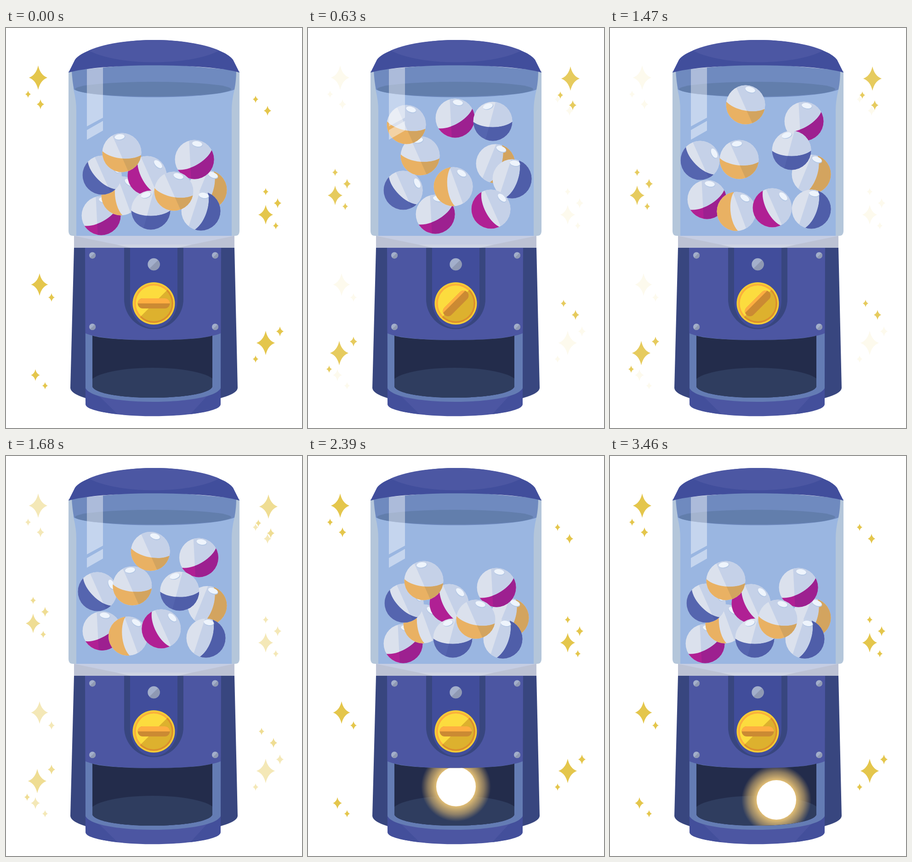
Write an HTML page that moves like this. It is 644 px wide and 870 px high and loops after 4460 ms.

```html
<!DOCTYPE html>
<html lang="en">
<head>
<meta charset="utf-8">
<title>Capsule machine</title>
<style>
  html, body { margin: 0; width: 100%; height: 100%; overflow: hidden; background: #fff; }
  svg { display: block; width: 100%; height: 100%; }
</style>
</head>
<body>
<svg viewBox="0 0 644 870">
  <defs>
    <clipPath id="round"><circle r="42.5"/></clipPath>
    <clipPath id="cap"><path d="M-44 0C-24 17 24 17 44 0V44H-44Z"/></clipPath>
    <clipPath id="bar"><rect x="-35" y="-11" width="70" height="22" rx="11"/></clipPath>
    <clipPath id="hatch"><path d="M188 669C225 682 412 682 449 669V780C437 812 200 812 188 780Z"/></clipPath>
    <path id="star" d="M0-1.33Q.22-.3 1 0Q.22 .3 0 1.33Q-.22 .3-1 0Q-.22-.3 0-1.33Z"/>
    <radialGradient id="halo">
      <stop offset=".56" stop-color="#e3bf75"/>
      <stop offset=".8" stop-color="#dcb76f" stop-opacity=".55"/>
      <stop offset="1" stop-color="#dcb76f" stop-opacity="0"/>
    </radialGradient>
  </defs>

  <g id="starsA" fill="#e4c64c"></g>
  <g id="starsB" fill="#e4c64c"></g>

  <!-- glass -->
  <path fill="#b4c6da" d="M136 94H508V442Q508 452 498 452H146Q136 452 136 442Z"/>
  <path fill="#9ab6e1" d="M144 94L147 134Q153 158 153 180V452H491V180Q491 158 497 134L500 94Z"/>
  <path fill="#6f8abf" d="M143 92Q144 114 148 134C200 156 444 156 497 134Q501 114 501 92L322 76Z"/>
  <ellipse fill="#627eac" cx="320" cy="133" rx="170" ry="16"/>
  <g id="balls"></g>
  <path fill="#fff" fill-opacity=".42" d="M176 80H211V195L176 214ZM176 222L211 202V223L176 243Z"/>

  <!-- lid -->
  <path fill="#414e9c" d="M136 97L150 69C167 45 245 26 322 26S477 45 494 69L508 97C440 76 205 76 136 97Z"/>
  <path fill="#4c57a3" d="M180 49C214 34 268 26 322 26S430 34 464 49C400 83 244 83 180 49Z"/>

  <!-- collar -->
  <path fill="#bcc2d4" d="M148 452H497V478H148Z"/>
  <path fill="#c5cde3" d="M148 452H497L405 471H240Z"/>
  <path fill="#ced4e3" d="M240 471H405L375 478H270Z"/>

  <!-- body -->
  <path fill="#38467f" d="M148 478H497L504 783Q503 795 467 805H173Q141 795 140 783Z"/>
  <path fill="#4c56a2" d="M172 478H468L467 818C450 853 190 853 173 818Z"/>
  <path fill="#434f9b" d="M173 785L205 803L243 840Q173 832 173 818ZM467 785L435 803L401 840Q467 832 467 818Z"/>
  <path fill="#647cb4" d="M173 664C215 684 425 684 467 664V783C450 823 190 823 173 783Z"/>
  <g clip-path="url(#hatch)">
    <path fill="#232c4b" d="M188 660H449V810H188Z"/>
    <ellipse fill="#2f3d5f" cx="319" cy="773" rx="137" ry="34"/>
    <g id="prize">
      <circle r="76" fill="url(#halo)"/>
      <circle r="43" fill="#fff"/>
    </g>
  </g>
  <path fill="#38467f" d="M257 478H386V590A64.5 65 0 0 1 257 590Z"/>
  <path fill="#414d9b" d="M270 478H373V592A51.5 61 0 0 1 270 592Z"/>
  <g id="studs"></g>

  <!-- knob -->
  <g transform="translate(321.5 599)">
    <circle r="46" fill="#f5cc36"/>
    <circle r="42.5" fill="#fbae3b"/>
    <circle r="39" fill="#fcdc3e"/>
    <path d="M-42.5 0A42.5 42.5 0 0 0 42.5 0Z" transform="rotate(-45)" fill="#823900" fill-opacity=".26"/>
    <g id="handle"><g clip-path="url(#bar)">
      <path fill="#cb8a33" d="M-40-20H40V20H-40Z"/>
      <path id="shine" fill="#ffae41" d="M-60-80H60V0H-60Z"/>
    </g></g>
  </g>
</svg>

<script>
const LOOP = 4460;
const $ = id => document.getElementById(id);

const HUES = {
  orange: ['#e9b163', '#d3a45f'],
  pink: ['#b02094', '#9d2090'],
  blue: ['#5565af', '#4f5ea9']
};

// Back to front: where each ball rests, is tossed, sinks and is tossed again
const TOSS_STEPS = [0, 9, 14, 21, 31];
const BALLS = [
  { hue: 'pink', cap: -30, spot: 10, tilt: 3, path: '207,408 277,405 273,406 211,373' },
  { hue: 'orange', cap: 84, spot: 32, tilt: 20, path: '250,365 316,345 297,319 275,399' },
  { hue: 'blue', cap: 45, spot: 63, tilt: 24, path: '209,320 207,353 219,355 196,288' },
  { hue: 'orange', cap: -72, spot: 21, tilt: -22, path: '438,352 408,295 442,344 438,318' },
  { hue: 'pink', cap: -30, spot: 10, tilt: 3, path: '410,286 320,196 330,263 422,203' },
  { hue: 'blue', cap: -71, spot: 10, tilt: -18, path: '424,398 444,328 428,315 438,394' },
  { hue: 'pink', cap: 63, spot: 44, tilt: 24, path: '307,321 398,394 374,364 353,391' },
  { hue: 'orange', cap: 6, spot: -8, tilt: 24, path: '252,271 244,278 255,287 281,286' },
  { hue: 'blue', cap: 0, spot: -18, tilt: -15, path: '315,396 402,203 307,277 395,266' },
  { hue: 'orange', cap: 11, spot: 17, tilt: 24, path: '365,355 214,210 283,320 295,167' }
];

// Star groups, each star as x, y and half width
const GROUPS = {
  trio: [[0, 0, 20], [-22, 36, 6], [5, 58, 8]],
  pair: [[0, 0, 6], [26, 25, 8]],
  quad: [[0, 0, 16], [0, -50, 6], [26, -25, 8], [22, 24, 6]],
  flare: [[0, 0, 20], [31, -25, 8], [-22, 35, 6]],
  duo: [[0, 0, 18.5], [26, 28, 7]],
  spark: [[0, 0, 9.5], [21, 23, 6]]
};
const SKY_A = { trio: [70, 108], pair: [543, 155], quad: [565, 406], flare: [565, 685], duo: [73, 558], spark: [64, 755] };
const SKY_B = { trio: [571, 110], pair: [556, 599], quad: [59, 364], flare: [68, 707] };

const sky = spots => Object.entries(spots).map(([name, [x, y]]) =>
  GROUPS[name].map(([dx, dy, r]) =>
    `<use href="#star" transform="translate(${x + dx} ${y + dy}) scale(${r})"/>`).join('')).join('');

const stud = (x, y, r = 7) => `<g transform="translate(${x} ${y}) rotate(-45)">
  <circle r="${r}" fill="#a3afcb"/>
  <path d="M${-r} 0A${r} ${r} 0 0 0 ${r} 0Z" fill="#8f99b3"/></g>`;

function ball({ hue, cap, spot, tilt }) {
  const [light, dark] = HUES[hue];
  const shade = (fill, turn) => `<path d="M0-90V90H90V-90Z" fill="${fill}"
    transform="rotate(${turn}) translate(${cap * .15 - 5}) rotate(${-tilt})"/>`;
  return `<g><g clip-path="url(#round)">
    <circle r="43" fill="#dbe1ed"/>
    ${shade('#c5d1e8', 0)}
    <g transform="rotate(${cap})"><g clip-path="url(#cap)">
      <circle r="44" fill="${light}"/>
      ${shade(dark, -cap)}
    </g></g></g>
    <g transform="rotate(${spot}) translate(0 -34.5)">
      <ellipse cx=".8" cy="1.2" rx="11.3" ry="6.3" fill="#b3c7e4"/>
      <ellipse rx="11" ry="5.8" fill="#eef4fc"/>
    </g></g>`;
}

// Smooth curve through the keys without overshoot
function track(keys, vals, k) {
  const slope = i => (vals[i + 1] - vals[i]) / (keys[i + 1] - keys[i]) || 0;
  const tangent = i => {
    const a = slope(i - 1), b = slope(i);
    return a * b > 0 ? 2 * a * b / (a + b) : 0;
  };
  const last = keys.length - 1;
  if (k <= keys[0]) return vals[0];
  if (k >= keys[last]) return vals[last];
  const i = keys.findIndex(key => key > k) - 1;
  const d = keys[i + 1] - keys[i], u = (k - keys[i]) / d, v = 1 - u;
  return v * v * (1 + 2 * u) * vals[i] + u * u * (1 + 2 * v) * vals[i + 1]
    + d * u * v * (v * tangent(i) - u * tangent(i + 1));
}

// The picture moves in steps that get longer towards the end
function stepAt(t) {
  if (t < 2120) return Math.min(29, Math.floor(t / 70));
  if (t < 2660) return 30 + Math.floor((t - 2120) / 90);
  return Math.min(44, 36 + Math.floor((t - 2660) / 100));
}

const place = (el, x, y) => el.setAttribute('transform', `translate(${x} ${y})`);

$('starsA').innerHTML = sky(SKY_A);
$('starsB').innerHTML = sky(SKY_B);
$('balls').innerHTML = BALLS.map(ball).join('');
$('studs').innerHTML = stud(321.5, 514, 13.2)
  + [188, 455].map(x => stud(x, 494.5) + stud(x, 650)).join('');

const movers = BALLS.map(({ path }, i) => {
  const points = path.split(' ').map(p => p.split(',').map(Number));
  points.push(points[0]);
  return { el: $('balls').children[i], xs: points.map(p => p[0]), ys: points.map(p => p[1]) };
});

function draw() {
  const k = stepAt(performance.now() % LOOP);

  for (const { el, xs, ys } of movers) place(el, track(TOSS_STEPS, xs, k), track(TOSS_STEPS, ys, k));

  // Two skies cross-fade, with a half swing back in the middle
  const fade = Math.min(1, Math.abs(Math.abs(k - 15) - 5) / 10);
  $('starsA').setAttribute('opacity', fade);
  $('starsB').setAttribute('opacity', 1 - fade);

  // The handle clicks round by eighths; its light stays at the upper left
  const turn = Math.min(8, Math.floor(k / 2.75)) * 45 % 180;
  const light = turn === 135 ? -45 : -turn;
  $('handle').setAttribute('transform', `rotate(${turn})`);
  $('shine').setAttribute('transform', `rotate(${light - turn}) translate(0 ${turn === 135 ? -5 : 0})`);

  // The prize drops, rolls left, then settles on the right
  $('prize').setAttribute('visibility', k < 32 ? 'hidden' : 'visible');
  place($('prize'),
    track([33, 35, 37, 44], [322, 289, 337, 362], k),
    Math.min(748, 690 + 29 * (k - 32)));
  requestAnimationFrame(draw);
}
draw();
</script>
</body>
</html>
```
